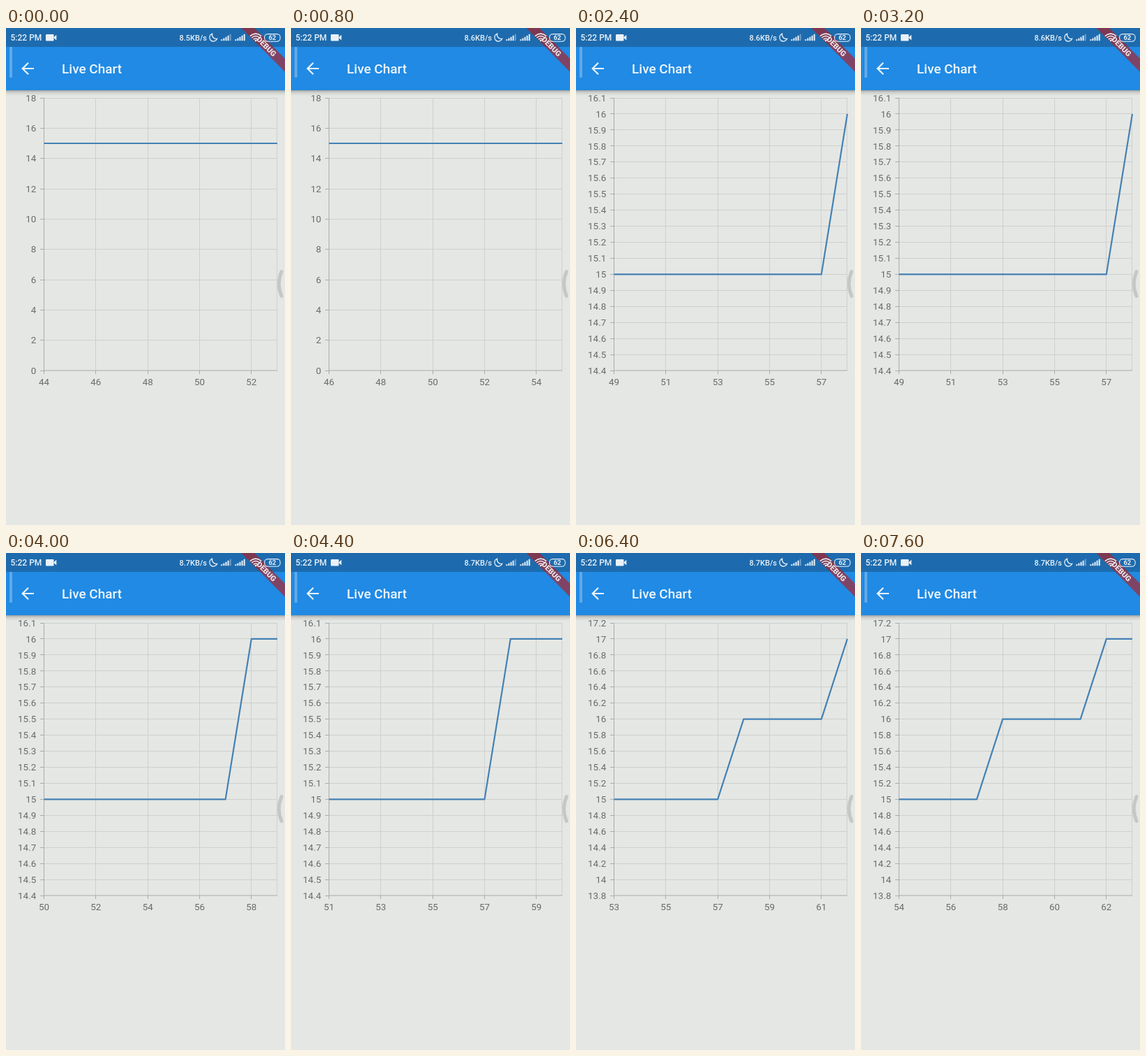
Animation of 400 by 711 pixels, one loop 8000 ms. Source, as an HTML page:

```html
<!DOCTYPE html>
<html lang="en">
<head>
<meta charset="utf-8">
<title>Live Chart</title>
<style>
  html, body { margin: 0; width: 100%; height: 100%; overflow: hidden; background: #e5e7e4; }
  svg { display: block; width: 100%; height: 100%; font-family: Roboto, sans-serif; }
  .status { fill: #eaf1f8; font-weight: 500; }
  .label { fill: #696b6a; font-size: 13.4px; }
  .grid { stroke: #cdd0cd; stroke-width: 1; }
  .axis { stroke: #a9aca9; stroke-width: 1; }
</style>
</head>
<body>
<svg viewBox="0 0 400 711">
  <defs>
    <linearGradient id="shade" x2="0" y2="1">
      <stop offset="0" stop-color="#000" stop-opacity=".3"/>
      <stop offset=".4" stop-color="#000" stop-opacity=".1"/>
      <stop offset="1" stop-color="#000" stop-opacity="0"/>
    </linearGradient>
  </defs>
  <rect width="400" height="711" fill="#e5e7e4"/>
  <g id="chart"></g>

  <rect y="89" width="400" height="8" fill="url(#shade)"/>
  <rect y="27" width="400" height="62" fill="#208ae4"/>
  <rect width="400" height="27" fill="#1d6bae"/>
  <rect x="5" y="27" width="4" height="44" rx="1" fill="#63a9e6"/>
  <path d="M40 58H24.5M32 49.7L23.7 58L32 66.3" fill="none" stroke="#eef5fc" stroke-width="2.2"/>
  <text x="80" y="64.6" font-size="19" font-weight="500" fill="#f0f6fc">Live Chart</text>

  <g transform="translate(400 0) rotate(45)">
    <rect x="-46" y="31" width="92" height="13.3" fill="#b71c1c" fill-opacity=".63"/>
    <text y="41.4" font-size="10.8" font-weight="900" text-anchor="middle" fill="#ece4e6">DEBUG</text>
  </g>

  <g class="status">
    <text x="6.5" y="18" font-size="12">5:22 PM</text>
    <text id="speed" x="248.5" y="17.7" font-size="11"></text>
    <rect x="57" y="9" width="11.5" height="9.4" rx="1.2"/>
    <path d="M68 13.7L72.3 9.8V17.6Z"/>
    <g id="bars"></g>
    <g fill="none" stroke="#eaf1f8" stroke-width="1.3">
      <path d="M295.6 8.2A5.6 5.6 0 1 0 302.7 15.4A6 6 0 0 1 295.6 8.2Z"/>
      <path d="M349.8 11.6Q358 4.6 366.2 11.6M352.3 14Q358 9 363.7 14M354.7 16.4Q358 13.6 361.3 16.4" stroke-width="1.5"/>
      <rect x="370.6" y="8.6" width="22.5" height="10.6" rx="4.6" stroke-width="1.1"/>
    </g>
    <circle cx="358" cy="18" r="1.3"/>
    <text x="381.8" y="17.3" font-size="9.4" font-weight="700" text-anchor="middle">62</text>
  </g>

  <path d="M395 348.5Q387.5 366 395 383.5" fill="none" stroke="#d0d2cf" stroke-width="5.4" stroke-linecap="round"/>
  <path d="M395 348.5Q387.5 366 395 383.5" fill="none" stroke="#c5c7c4" stroke-width="4" stroke-linecap="round"/>
</svg>
<script>
  const LOOP = 8000;
  // [time, first x value shown]
  const starts = [[0, 44], [400, 46], [1600, 48], [2400, 49], [3600, 50],
                  [4400, 51], [5200, 52], [6400, 53], [6800, 54]];
  const speeds = [[0, '8.5'], [800, '8.6'], [3600, '8.7']];

  const left = 54.5, right = 389, top_ = 100, bottom = 490, span = 9;
  const unit = (right - left) / span;
  const chart = document.getElementById('chart');
  const speed = document.getElementById('speed');

  const at = (steps, t) => steps.filter(s => s[0] <= t).pop()[1];
  const value = n => n < 58 ? 15 : n < 62 ? 16 : 17;
  const line = (x1, y1, x2, y2, cls) =>
    `<line x1="${x1}" y1="${y1}" x2="${x2}" y2="${y2}" class="${cls}"/>`;
  const label = (x, y, anchor, text) =>
    `<text x="${x}" y="${y}" text-anchor="${anchor}" class="label">${text}</text>`;

  // [lowest tick, tick step, number of steps]
  function scaleFor(first) {
    const max = value(first + span);
    return max === 15 ? [0, 2, 9] : max === 16 ? [14.4, .1, 17] : [13.8, .2, 17];
  }

  function draw(first) {
    const [min, step, count] = scaleFor(first);
    const gap = (bottom - top_) / count;
    let grid = '', axis = '', points = '';
    for (let i = 0; i <= count; i++) {
      const y = bottom - i * gap;
      const crisp = Math.floor(y) + .5;
      if (i) grid += line(left, crisp, right, crisp, 'grid');
      axis += line(49, crisp, left, crisp, 'axis');
      axis += label(43.2, y + 4.7, 'end', +(min + i * step).toFixed(1));
    }
    for (let n = 0; n <= span; n++) {
      const x = left + n * unit;
      const y = bottom - (value(first + n) - min) / step * gap;
      points += `${x},${y} `;
      if (n % 2) continue;
      const crisp = Math.floor(x) + .5;
      if (n) grid += line(crisp, top_, crisp, bottom, 'grid');
      axis += line(crisp, bottom, crisp, 495, 'axis');
      axis += label(x, 511.1, 'middle', first + n);
    }
    grid += line(388.5, top_, 388.5, bottom, 'grid');
    axis += line(left, top_, left, bottom, 'axis') + line(left, 490, right, 490, 'axis');
    chart.innerHTML = grid + axis +
      `<polyline points="${points}" fill="none" stroke="#4481b4" stroke-width="2.2" stroke-linejoin="round"/>`;
  }

  function signal(x, lit) {
    return [2, 3.6, 5.4, 7.4, 9.4].map((h, i) =>
      `<rect x="${x + i * 3.1}" y="${18.2 - h}" width="2" height="${h}" opacity="${i < lit ? 1 : .4}"/>`).join('');
  }
  document.getElementById('bars').innerHTML = signal(308.3, 4) + signal(328.3, 5);

  let shown;
  function tick() {
    const t = performance.now() % LOOP;
    const first = at(starts, t);
    if (first !== shown) draw(shown = first);
    speed.textContent = at(speeds, t) + 'KB/s';
    requestAnimationFrame(tick);
  }
  tick();
</script>
</body>
</html>
```
